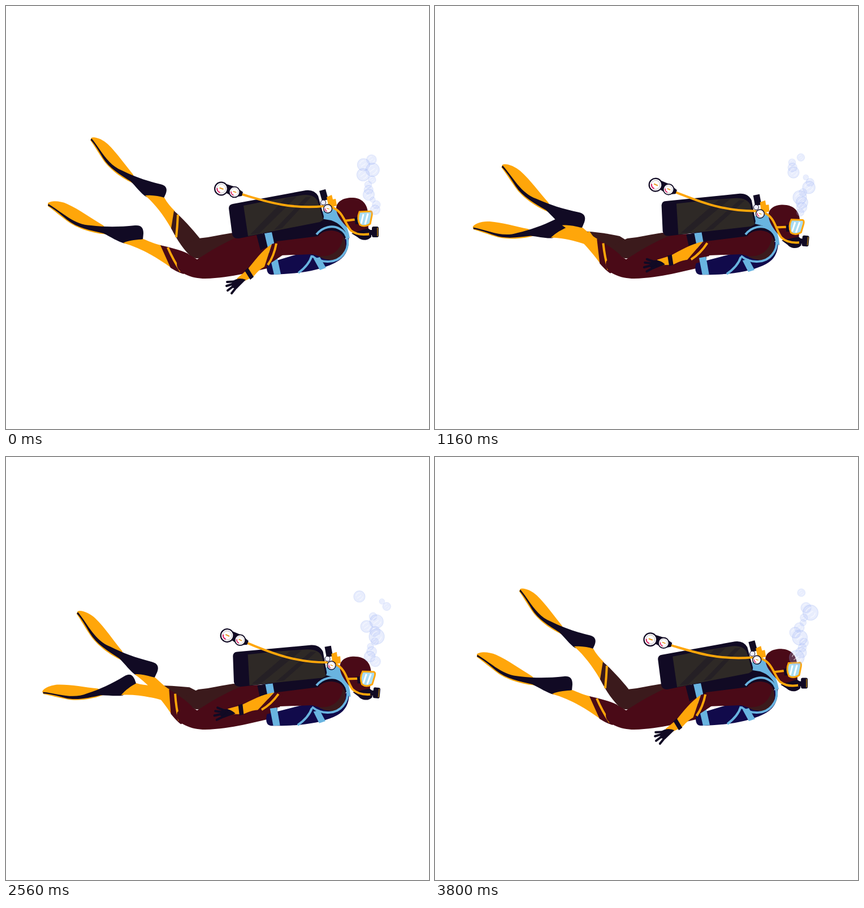
An HTML page that plays this animation: 748 px wide and 748 px high, repeating every 3.84 s.

```html
<!DOCTYPE html>
<html lang="en">
<head>
<meta charset="utf-8">
<title>Diver</title>
<style>
html, body { margin: 0; width: 100%; height: 100%; overflow: hidden; background: #fff; }
svg { display: block; width: 100vw; height: 100vh; }
.yellow { fill: #ffa60a; }
.ink { fill: #110a24; }
.suit { fill: #4a0a17; }
.shade { fill: #3b1a1c; }
.navy { fill: #110a4b; }
.blue { fill: #69b4e0; }
.line { fill: none; stroke: #ffa60a; stroke-width: 4; }
.trim { fill: none; stroke: #69b4e0; stroke-width: 4; }
.fingers { fill: none; stroke: #110a24; stroke-width: 4; stroke-linecap: round; }
#bubbles circle { fill: #a5b8f8; fill-opacity: .25; stroke: #8fa9f2; stroke-opacity: .22; }
#bubbles path { fill: none; stroke: #fff; stroke-width: .13; stroke-opacity: .5; }
</style>
</head>
<body>
<svg viewBox="0 0 748 748">
  <defs>
    <g id="dial">
      <circle r="12.5" class="ink"/>
      <circle r="10.3" fill="#fff"/>
      <circle r="8" fill="none" stroke="#aaa3a8" stroke-width=".8"/>
      <path d="M-7 -1A7 7 0 0 0 -2 6.700" fill="none" stroke="#e0115f" stroke-width="2"/>
      <path d="M-3 -1.500L4 1" stroke="#e89a20" stroke-width="2"/>
    </g>
    <g id="fin">
      <path class="yellow" d="M74 349C78 344 95 344 108 350C130 360 150 375 172 388L185 404C160 404 130 395 112 383C98 373 84 361 74 354Z"/>
      <path class="ink" d="M75 350C100 365 120 387 150 388C175 391 200 391 228 388C240 387 243 393 243 402L242 413C232 416 222 415 210 420C198 417 185 408 172 402C150 397 125 392 108 378C95 367 84 358 74 353Z"/>
    </g>
  </defs>

  <g id="farLeg">
    <use href="#fin" transform="translate(263 337) rotate(19.5) scale(.93) translate(-225 -414)"/>
    <path class="yellow" d="M246 335C258 334 270 336 280 339C285 348 291 355 298 362L293 395C282 375 264 350 246 335Z"/>
    <path class="shade" d="M297 362C312 375 330 395 342 410L348 428L330 446C315 432 303 415 292 393Z"/>
    <path class="line" d="M304 369Q303 390 301 409"/>
  </g>
  <path class="shade" d="M340 411C362 409 385 403 402 401L440 405L430 430C390 440 360 448 335 446C322 442 316 430 320 420Z"/>

  <g id="nearLeg">
    <use href="#fin"/>
    <path class="yellow" d="M207 419C220 413 232 414 243 412C253 416 263 421 274 423L292 463C270 447 240 428 207 419Z"/>
    <path class="suit" d="M273 423C290 427 308 431 322 438L328 458L314 474C304 471 298 467 291 463Z"/>
    <path class="line" d="M286 427Q296 450 309 469"/>
  </g>
  <path class="suit" d="M338 448C360 434 385 418 420 404L480 402V460C440 468 400 481 352 482C340 482 328 480 316 474C304 468 300 460 303 451L321 438Z"/>

  <g id="vest">
    <path class="ink" d="M443 405L558 376C580 372 600 385 605 404L590 425L550 410L478 418L450 432Z"/>
    <path class="navy" d="M462 455L545 430L606 410C607 435 597 447 580 455C555 467 520 474 470 475Q461 475 461 462Z"/>
    <path class="blue" d="M457 402L470 400L486 474L474 475ZM544 447L555 444L566 463L555 467Z"/>
    <path class="trim" d="M541 441Q536 458 517 472"/>
  </g>

  <g id="torso">
    <path class="blue" d="M557 364L580 358C592 370 605 388 608 411L604 409C600 395 590 384 575 379L557 376Z"/>
    <path class="ink" d="M394 358Q394 351 401 350L530 326Q545 324 552 336L562 372Q562 380 555 382L412 411Q402 412 400 404Z"/>
    <path fill="#2e2926" d="M420 353L470 343L520 335Q544 331 551 345L561 378L555 382L428 407Z"/>
    <path class="ink" opacity=".3" d="M432 404L494 340L514 337L448 402ZM474 396L530 338L540 337L488 393Z"/>
    <path class="ink" d="M554 327L565 324L570 342L559 345Z"/>
    <path class="yellow" d="M567 338L576 334L578 342L583 341L585 353L571 357Z"/>
    <path class="line" d="M417 333C455 344 500 360 562 354"/>
    <path class="suit" d="M584 358C584 344 600 338 614 339C630 340 638 350 640 364L641 402C630 408 612 404 604 392C594 382 584 370 584 358Z"/>
    <path class="ink" d="M611 402L640 393L646 397V408C640 416 628 415 622 409Z"/>
    <path class="line" d="M576 356C596 362 599 385 610 397Q624 408 648 402M598 380L622 377"/>
    <path class="ink" d="M616 374L624 373L625 385L618 386Z"/>
    <path d="M625 364L645 363Q648 364 647 370L644 385Q634 392 626 387Q620 376 625 364Z" fill="#a9dcf3" stroke="#ffa60a" stroke-width="3"/>
    <path d="M632 368L628 385M640 367L635 386" stroke="#fff" stroke-width="3"/>
    <rect class="ink" x="647" y="390" width="12" height="19" rx="3"/>
    <path class="ink" d="M642 396H650V405H642Z"/>
    <path d="M657 392V407" stroke="#8b6518" stroke-width="2"/>
    <circle cx="561" cy="347.500" r="4.500" fill="#eef" stroke="#110a24"/>
    <use href="#dial" transform="translate(569 358.500) scale(.66)"/>
    <path class="ink" d="M390 315L406 320L419 329L417 336L404 338L390 331Z"/>
    <use href="#dial" transform="translate(380.500 323)"/>
    <use href="#dial" transform="translate(404 329) scale(.82)"/>
  </g>

  <path class="suit" d="M480 416L552 407C560 396 582 393 594 404C606 418 600 440 584 447C570 450 555 442 541 439L484 441C472 440 472 422 480 416Z"/>
  <path class="shade" d="M596 408C606 424 598 445 580 449C568 450 558 446 552 442C575 445 593 433 596 408Z"/>
  <path class="trim" d="M549 404C560 390 578 387 590 394C606 402 609 425 596 440C585 454 560 457 541 442"/>

  <g id="forearm">
    <path class="suit" d="M470 421L484 416L490 440L457 462Z"/>
    <path class="yellow" d="M470 421C452 433 440 450 427 466L408 482L418 488L437 479C447 467 452 464 457 461Z"/>
    <path class="line" d="M478 420Q474 442 463 458"/>
    <path class="ink" d="M422 468L428 463L438 479L432 484ZM424 484C416 481 408 481 400 487L399 498L408 500Z"/>
    <path class="fingers" d="M408 487L391 488M406 490L390 495M405 493L392 503M410 494L399 508"/>
  </g>

  <g id="bubbles"></g>
</svg>

<script>
const LOOP = 3840, STEP = 40;
const BUBBLES = 26, FIRST_BIRTH = -3000, BIRTH_GAP = 260;
const RISE = .034, MOUTH_X = 647, MOUTH_Y = 365;
const byId = id => document.getElementById(id);

let seed = 11;
function random(min, max) {
  seed = (seed * 16807) % 2147483647;
  return min + (max - min) * seed / 2147483647;
}

function makeBubble(_, i) {
  const node = document.createElementNS('http://www.w3.org/2000/svg', 'g');
  node.innerHTML = '<circle r=".96" stroke-width=".1"/><path d="M-.6-.1Q-.4-.6.1-.65M.6 0Q.5.5 0 .6M-.4.3L.3-.2"/>';
  byId('bubbles').append(node);
  return {
    node,
    born: FIRST_BIRTH + i * BIRTH_GAP,
    life: random(2300, 3800),
    x: MOUTH_X + random(-8, 8),
    drift: random(-.008, .008),
    radius: random(5, 14)
  };
}
const bubbles = Array.from({ length: BUBBLES }, makeBubble);

function drawBubble({ node, born, life, x, drift, radius }, t) {
  const age = t - born;
  const grow = Math.min(1, .5 + age / 500, (life - age) / 120);
  const size = age < 0 ? 0 : radius * Math.max(0, grow);
  node.setAttribute('transform', `translate(${x + drift * age} ${MOUTH_Y - RISE * age}) scale(${size})`);
}

function rotate(id, angle, x, y) {
  byId(id).setAttribute('transform', `rotate(${angle} ${x} ${y})`);
}

function draw(t) {
  const swing = 1 - Math.abs(1 - t / (LOOP / 2));
  const kick = swing * swing * (3 - 2 * swing);
  rotate('farLeg', -60 * kick, 330, 430);
  rotate('nearLeg', 27 * kick, 316, 460);
  rotate('torso', 8 * swing, 465, 433);
  rotate('vest', 3.5 * swing, 465, 440);
  rotate('forearm', 38 * swing, 482, 428);
  bubbles.forEach(bubble => drawBubble(bubble, t));
}

function tick(now) {
  draw(Math.floor((now % LOOP) / STEP) * STEP);
  requestAnimationFrame(tick);
}
draw(0);
requestAnimationFrame(tick);
</script>
</body>
</html>
```
